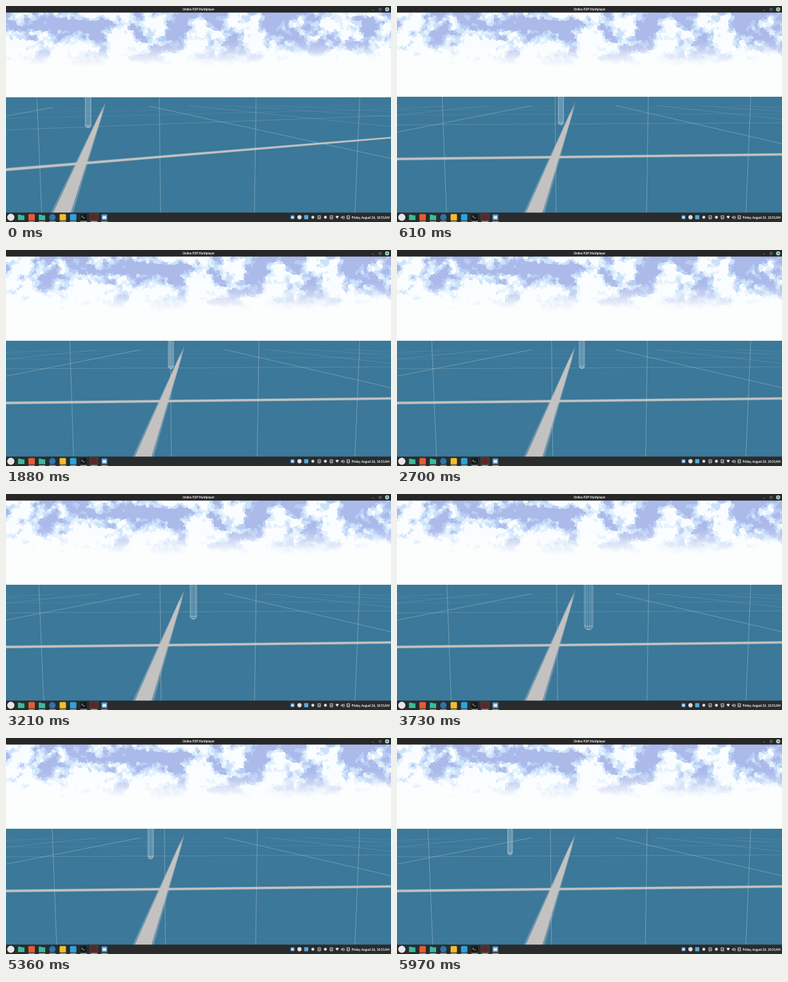
Write an HTML page with a canvas that moves like this. It is 600 px wide and 338 px high and loops after 6 s.

```html
<!DOCTYPE html>
<html lang="en">
<head>
<meta charset="utf-8">
<title>Online P2P Multiplayer</title>
<style>
html, body { margin: 0; width: 100%; height: 100%; overflow: hidden; background: #fff; }
#sky, #stage { position: absolute; left: 0; top: 0; display: block; }
text { font-family: Lato, "Open Sans", sans-serif; font-weight: 700; fill: #f2f2f2; }
</style>
</head>
<body>
<canvas id="sky" width="600" height="338"></canvas>
<svg id="stage" width="600" height="338" viewBox="0 0 600 338">
  <defs>
    <linearGradient id="fade" gradientUnits="userSpaceOnUse" x1="0" y1="149" x2="0" y2="172">
      <stop offset="0" stop-color="#c3c2c1" stop-opacity="0"/>
      <stop offset="1" stop-color="#c3c2c1"/>
    </linearGradient>
  </defs>
  <rect id="floor" width="600" height="190" fill="#3b7899"/>
  <g id="grid" fill="none" stroke="#b9cbd4" stroke-width=".7"></g>
  <path id="bandEdge" fill="#c3c2c1" opacity=".4"/>
  <path id="band" fill="#c3c2c1"/>
  <path id="roadEdge" fill="url(#fade)" opacity=".4"/>
  <path id="road" fill="url(#fade)"/>
  <path id="seams" stroke="#c3d3da" stroke-width=".7" opacity=".6"/>
  <path id="capsule" fill="none" stroke="#e4eef3" stroke-width=".6" opacity=".8"/>
  <rect width="600" height="10.3" fill="#272727"/>
  <text x="300" y="7" font-size="4.8" text-anchor="middle">Online P2P Multiplayer</text>
  <path d="M570.5 6.3h2.5M581.6 3.8h3v3h-3z" fill="none" stroke="#aaa" stroke-width=".6"/>
  <circle cx="594" cy="5.2" r="3.2" fill="#a5d6c8"/>
  <path d="M592.8 4l2.4 2.4m0-2.4l-2.4 2.4" stroke="#333" stroke-width=".7"/>
  <rect y="323.3" width="600" height="14.7" fill="#292b2d"/>
  <g id="icons"></g>
  <text x="538.8" y="332.7" font-size="4.75">Friday, August 26, 10:31AM</text>
</svg>
<script>
const LOOP = 6000, TURN = 610;
const FOCAL = 387, CENTRE = 300, NEAR = 1.5, RAD = Math.PI / 180;
const YAW_START = -20.1 * RAD, YAW_END = -2.8 * RAD;
const SKY_W = 730, SKY_H = 133, SKY_TOP = 10;
// Floor units are camera heights: across is sideways, along is forward
const origin = { across: -.37, along: 4.12 };
const gap = { across: 4.7, along: 5 };

const $ = id => document.getElementById(id);
const mix = (a, b, k) => a + (b - a) * k;
const clamp = v => Math.max(0, Math.min(1, v));
const smooth = v => v * v * (3 - 2 * v);
const range = (n, fn) => Array.from({ length: n }, (_, i) => fn(i));
const set = (id, d) => $(id).setAttribute('d', d);

function hash(x, y) {
  const s = Math.sin(x * 127.1 + y * 311.7) * 43758.5453;
  return s - Math.floor(s);
}

function noise(x, y) {
  const ix = Math.floor(x), iy = Math.floor(y);
  const u = smooth(x - ix), v = smooth(y - iy);
  return mix(mix(hash(ix, iy), hash(ix + 1, iy), u),
             mix(hash(ix, iy + 1), hash(ix + 1, iy + 1), u), v);
}

// Centres of the deepest blue between the clouds
const deeps = [[215, 8], [410, 10], [535, 18], [675, 18], [480, 42]];
const tones = ['#acbaea', '#b8ccf4', '#cce2fa', '#e4f1fd', '#fafdff']
  .map(c => [1, 3, 5].map(i => parseInt(c.slice(i, i + 2), 16)));

function skyTone(x, y) {
  const n = noise(x / 30, y / 18) * .5 + noise(x / 11 + 9, y / 8) * .32 + noise(x / 5, y / 5) * .18;
  let blue = .5 + (n - .5) * 1.3 - (y - 30) * .001;
  for (const [cx, cy] of deeps)
    blue += .2 * Math.exp(-(((x - cx) / 42) ** 2) - ((y - cy) / 18) ** 2);
  const level = Math.floor((.7 - blue) / .075) + 1;
  return tones[Math.max(0, Math.min(tones.length - 1, level))];
}

// Small irregular cells give the clouds their brushed edges
function paintSky() {
  const canvas = document.createElement('canvas');
  canvas.width = SKY_W;
  canvas.height = SKY_H;
  const ctx = canvas.getContext('2d');
  const img = ctx.createImageData(SKY_W, SKY_H);
  const size = 4, cells = new Map();
  const cell = (i, j) => {
    const key = i * 1000 + j;
    if (!cells.has(key)) {
      const x = (i + hash(i, j)) * size, y = (j + hash(i + 70, j + 31)) * size;
      cells.set(key, { x, y, tone: skyTone(x, y) });
    }
    return cells.get(key);
  };
  for (let y = 0; y < SKY_H; y++) for (let x = 0; x < SKY_W; x++) {
    const i = Math.floor(x / size), j = Math.floor(y / size);
    let best, nearest = Infinity;
    for (let a = -1; a < 2; a++) for (let b = -1; b < 2; b++) {
      const c = cell(i + a, j + b);
      const d = (c.x - x) ** 2 + (c.y - y) ** 2;
      if (d < nearest) { nearest = d; best = c; }
    }
    const haze = smooth(clamp((y - 38) / 52));
    const p = (y * SKY_W + x) * 4;
    best.tone.forEach((v, k) => { img.data[p + k] = mix(v, k ? 254 : 252, haze); });
    img.data[p + 3] = 255;
  }
  ctx.putImageData(img, 0, 0);
  return canvas;
}

function paintIcons() {
  const square = (s, c) =>
    `<rect x="${-s / 2}" y="${-s / 2}" width="${s}" height="${s}" rx="${s / 6}" fill="${c}"/>`;
  const circle = (r, c) => `<circle r="${r}" fill="${c}"/>`;
  const stroke = d => `<path d="${d}" fill="none" stroke="#e4e4e4" stroke-width=".9"/>`;
  const folder = '<path d="M-5-4h4l1 1h5v7.5H-5z" fill="#35bd9b"/>';
  const windowIcon = s => square(s, '#5298d2') +
    `<rect x="${-s * .3}" y="${-s * .2}" width="${s * .6}" height="${s * .45}" fill="#eef4f8"/>`;
  const sheet = stroke('M-2-2.4h4v4.8h-4zM-1 .4h2');

  const launchers = [
    circle(5.6, '#e6e6e6'), folder, square(10, '#e85b30'), folder, circle(5, '#2d74ac'),
    square(10, '#f2bd28'), square(10, '#2da3dc'),
    square(10, '#171919') + stroke('M-3-2.5l1.6 1.4-1.6 1.4M-.5 1h2.2'),
    '<rect x="-7" y="-7" width="14" height="14.5" fill="#42393a"/>' + circle(4.8, '#642322'),
    windowIcon(9)
  ];
  const tray = [
    windowIcon(6), circle(3.3, '#dedede'), square(6.5, '#55acd9'), circle(2.3, '#dedede'),
    sheet, circle(2.3, '#dedede'), sheet,
    '<path d="M-2.7-1.4q2.7-2 5.4 0L0 2.4z" fill="#e4e4e4"/>',
    stroke('M-2.5-.5h1l1.5-1.3v4l-1.5-1.3h-1zM1.5-2q2 2.4 0 4.8'), sheet
  ];
  const place = (x, icon) => `<g transform="translate(${x} 330.6)">${icon}</g>`;
  const underline = stroke('M-5 6.6h10');
  $('icons').innerHTML =
    launchers.map((icon, i) => place(7.5 + 16.2 * i, icon + (i > 1 ? underline : ''))).join('') +
    tray.map((icon, i) => place(446.5 + 11 * i - .15 * i * i, icon)).join('');
}

function cameraAt(t) {
  const k = smooth(clamp(t / TURN));
  return { yaw: mix(YAW_START, YAW_END, k), horizon: mix(142.8, 142, k) };
}

function toView(cam, across, along) {
  const s = Math.sin(cam.yaw), c = Math.cos(cam.yaw);
  return { x: along * s + across * c, z: along * c - across * s };
}

function project(cam, { x, z }) {
  return { x: CENTRE + FOCAL * x / z, y: cam.horizon + FOCAL / z };
}

// Projects a floor segment, cut where it passes the camera
function segment(cam, from, to) {
  const a = toView(cam, ...from), b = toView(cam, ...to);
  const cut = (p, q) => {
    if (p.z >= NEAR) return p;
    return { x: mix(p.x, q.x, (NEAR - p.z) / (q.z - p.z)), z: NEAR };
  };
  return [cut(a, b), cut(b, a)].map(p => project(cam, p));
}

const alongLine = (cam, across, far) => segment(cam, [across, -5], [across, far]);
const acrossLine = (cam, along) => segment(cam, [-90, along], [90, along]);
const path = points => 'M' + points.map(p => `${p.x.toFixed(2)} ${p.y.toFixed(2)}`).join('L');
const strip = (a, b) => path([...a, ...b.reverse()]) + 'Z';

const road = (cam, half) => strip(
  alongLine(cam, origin.across - half, 45), alongLine(cam, origin.across + half, 45));
const band = (cam, half) => strip(
  acrossLine(cam, origin.along - half), acrossLine(cam, origin.along + half));

const gridLines = [1, 2, 3, 4].flatMap(n => [
  { opacity: .6 / n, at: cam => alongLine(cam, origin.across - n * gap.across, 28) },
  { opacity: .6 / n, at: cam => alongLine(cam, origin.across + n * gap.across, 28) },
  { opacity: .36 / n, at: cam => acrossLine(cam, origin.along + n * gap.along) }
]);

// The other player's walk: time, across, along
const walk = [
  [0, -.6, 8.87], [1880, -.55, 8.9], [2700, .16, 8.9],
  [3730, .25, 5.5], [4730, .27, 6.85], [LOOP, -2.65, 9.75]
];

function playerAt(t) {
  const next = walk.findIndex(p => p[0] > t);
  const a = walk[next - 1], b = walk[next];
  const k = (t - a[0]) / (b[0] - a[0]);
  return [mix(a[1], b[1], k), mix(a[2], b[2], k)];
}

function capsule(cam, t) {
  const { x, y } = project(cam, toView(cam, ...playerAt(t)));
  const r = (y - cam.horizon) / 10.6, ring = y - r * .95;
  const ribs = [-1, -.68, -.25, .25, .68, 1].map(c =>
    `M${x + r * c} ${cam.horizon}V${ring}Q${x + r * c} ${y - r * .2} ${x + r * c * .3} ${y}`);
  return ribs.join('') + `M${x - r} ${ring}Q${x} ${ring + r * .4} ${x + r} ${ring}` +
    `M${x - r * .3} ${y}h${r * .6}`;
}

// Upright lines around the viewer, swaying most on the left
function seams(cam, t) {
  const sway = .67 + .37 * Math.cos(4 * Math.PI * t / LOOP);
  return range(4, k => {
    const x = CENTRE + FOCAL * Math.tan((33 - 18.9 * k - sway * k * k) * RAD);
    return `M${x} ${cam.horizon}L${x + (CENTRE - x) * .03} 324`;
  }).join('');
}

function draw(t) {
  const cam = cameraAt(t);
  const shift = FOCAL * (Math.tan(cam.yaw) - Math.tan(YAW_END));
  skyContext.drawImage(sky, shift, SKY_TOP);
  $('floor').setAttribute('y', cam.horizon);
  gridLines.forEach((l, i) => $('grid').children[i].setAttribute('d', path(l.at(cam))));
  set('bandEdge', band(cam, .1));
  set('band', band(cam, .07));
  set('roadEdge', road(cam, .09));
  set('road', road(cam, .07));
  set('seams', seams(cam, t));
  set('capsule', capsule(cam, t));
}

const sky = paintSky();
const skyContext = $('sky').getContext('2d');
$('grid').innerHTML = gridLines.map(l => `<path opacity="${l.opacity}"/>`).join('');
paintIcons();
draw(0);
const start = performance.now();
function tick() {
  draw((performance.now() - start) % LOOP);
  requestAnimationFrame(tick);
}
requestAnimationFrame(tick);
</script>
</body>
</html>
```
